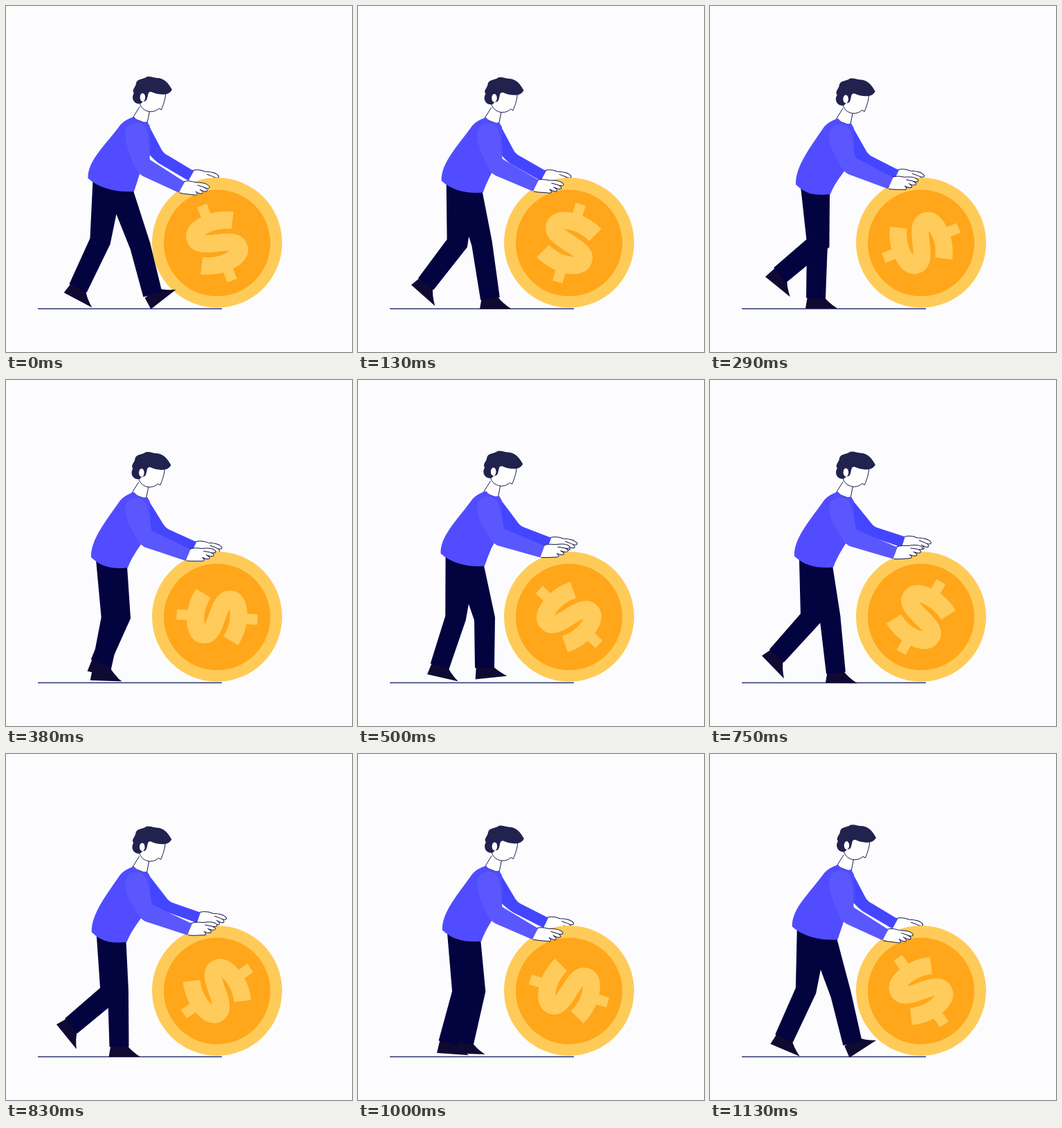
Animation, 500 px wide and 500 px high, one loop 1.18 s. Source, as an HTML page:

```html
<!DOCTYPE html>
<html lang="en">
<head>
<meta charset="utf-8">
<title>Pushing a coin</title>
<style>
  html, body { margin: 0; width: 100%; height: 100%; overflow: hidden; background: #fcfcff; }
  svg { display: block; width: 100%; height: 100%; }
  .line { fill: #fff; stroke: #17174a; stroke-width: 1; stroke-linejoin: round; stroke-linecap: round; }
  .pants { fill: #03033f; }
  .shoe { fill: #100a33; }
  .hair { fill: #22224f; }
  .near { fill: #5a57ff; }
  .torso { fill: #514cff; }
  .far { fill: #4445ff; }
</style>
</head>
<body>
<svg viewBox="0 0 500 500">
  <defs>
    <path id="hand" class="line" d="M2,-8 C8,-10 14,-9 20,-7 C28,-7 37,-6 40,-1 C41,2 36,2 32,0 C38,3 38,6 34,6
      C31,6 28,4 26,3 C32,7 31,10 27,9 C24,9 22,7 20,6 C24,10 22,12 18,11 C12,10 4,10 -3,8 M23,-3 L32,0"/>
    <path id="shoe" class="shoe" d="M-15,15 L-12,-3 L11,-3 Q17,6 31,15 Z"/>
  </defs>
  <path d="M46,437.5 H312" stroke="#28306f" stroke-width="1.6"/>

  <use id="farHand" href="#hand"/>
  <path id="farArm" class="far"/>

  <circle cx="305" cy="342" r="94" fill="#ffcb58"/>
  <circle cx="305" cy="342.5" r="77" fill="#ffa61a"/>
  <g id="sign" fill="none" stroke="#ffcb5a">
    <path stroke-width="25" d="M33,-22 C20,-29 10,-31 0,-31 C-18,-31 -27,-26 -27,-17 C-27,-8 -15,-4 0,0
      C15,4 27,8 27,17 C27,26 18,31 0,31 C-10,31 -20,29 -33,22"/>
    <path stroke-width="15" d="M0,-58.5 V-38 M0,58.5 V38"/>
  </g>

  <use id="shoeA" href="#shoe"/>
  <path id="legA" class="pants"/>
  <use id="shoeB" href="#shoe"/>
  <path id="legB" class="pants"/>

  <g id="head">
    <path class="line" d="M193,146 L183,162 L204,170 L207.500,152"/>
    <path class="line" d="M231,122 C231,134 228,141 224.500,150 L221,148 C216,153 208,154 202,151 C196,148 193,143 193,137 L196,120 Z"/>
    <path class="hair" d="M195,141 C186,143 180,134 185,126 C181,121 188,117 188,112 C189,105 199,106 203,102.500
      C210,101 213,104 218,104 C228,104 235,111 240,121 C236,129 224,130 210,124 C204,123 206,131 203,136
      C200,139 199,137 198,138 Z"/>
    <ellipse cx="197.500" cy="132" rx="3.800" ry="6" fill="#fff"/>
  </g>

  <path id="torso" class="torso"/>
  <use id="nearHand" href="#hand"/>
  <path id="nearArm" class="near"/>
</svg>
<script>
const LOOP = 1180, FRAMES = 28, FRAME_MS = 1000 / 24;

// frame, knee x, knee y, ankle x, ankle y, foot angle
const STRIDE = [
  [0, 194, 347, 212, 417, -38], [1, 189, 344, 209, 420, -15],
  [2, 184, 343, 200, 422, -3], [3, 179, 343, 191, 423, 0],
  [6, 162, 343, 163.5, 423, 0], [7, 155, 343, 153, 422, 0],
  [10, 151, 345, 130, 418, 4], [12, 141, 344, 118, 414, 13],
  [13, 138.5, 342, 107, 411, 23], [14, 136, 340, 104, 408, 28],
  [15, 138.5, 341, 102, 407, 33], [20, 151, 345, 94, 393, 51],
  [21, 157, 342, 101, 389, 39], [24, 169, 343, 153, 418, 2],
  [26, 183, 345, 183, 416, -6], [27, 189, 347, 206, 418, -33]
];

// frame, near wrist x, y, far wrist x, y
const REACH = [
  [0, 254, 262, 267.5, 245.5], [7, 261, 256, 269.5, 244.5],
  [12, 266.5, 248, 276.5, 235.5], [15, 269, 246, 279, 232.5],
  [20, 265.5, 253.5, 278.5, 236.5], [24, 256, 260, 271.5, 244],
  [27, 253.5, 261.5, 267.5, 245.5]
];

const el = id => document.getElementById(id);
const set = (id, name, value) => el(id).setAttribute(name, value);
const place = (id, x, y, turn = 0) =>
  set(id, 'transform', `translate(${x} ${y}) rotate(${turn})`);
const poly = points => 'M' + points.map(p => p.join()).join('L') + 'Z';

// Periodic cubic through unevenly spaced keys
function pose(keys, n) {
  const count = keys.length;
  const at = j => keys[(j + count) % count];
  const time = j => at(j)[0] + FRAMES * Math.floor(j / count);
  let i = count - 1;
  while (keys[i][0] > n) i--;
  const span = time(i + 1) - time(i);
  const u = (n - time(i)) / span;
  return at(i).slice(1).map((a, k) => {
    const value = j => at(j)[k + 1];
    const slope = j => (value(j + 1) - value(j - 1)) / (time(j + 1) - time(j - 1)) * span;
    const b = value(i + 1), m = slope(i), q = slope(i + 1);
    return a + u * (m + u * (3 * (b - a) - 2 * m - q + u * (2 * (a - b) + m + q)));
  });
}

function unit(x, y) {
  const d = Math.hypot(x, y);
  return [x / d, y / d];
}

// Two points across a limb, left of and right of its direction
function across(x, y, [dx, dy], half) {
  return [[x - dy * half, y + dx * half], [x + dy * half, y - dx * half]];
}

function drawLeg(name, n, hipL, hipR) {
  const [kx, ky, ax, ay, turn] = pose(STRIDE, n % FRAMES);
  const left = [hipL[0] + Math.max(0, (kx - 162) * 0.45), hipL[1]];
  const right = [hipR[0] + Math.min(0, (kx - 152) * 1.1), hipR[1]];
  const thigh = unit(kx - (left[0] + right[0]) / 2, ky - 265);
  const shin = unit(ax - kx, ay - ky);
  const bend = unit(thigh[0] + shin[0], thigh[1] + shin[1]);
  const cos = bend[0] * shin[0] + bend[1] * shin[1];
  const [kneeL, kneeR] = across(kx, ky, bend, 15 / cos);
  const [hemL, hemR] = across(ax, ay, shin, 14);
  set('leg' + name, 'd', poly([left, right, kneeR, hemR, hemL, kneeL]));
  place('shoe' + name, ax, ay, turn);
}

function drawArms(n, bob) {
  const [x, y, fx, fy] = pose(REACH, n);

  const ex = 200 + (x - 254) * 0.25, ey = 232 + (y - 262) * 0.5;
  const [low, up] = across(x, y, unit(x - ex, y - ey), 9);
  set('nearArm', 'd', `M172,${184 + bob} C173,${200 + bob} 178,${ey - 18} ${ex - 15},${ey - 2}
    Q${ex - 11},${ey + 9} ${ex - 2},${ey + 14} L${low} L${up} L${ex + 8},${ey - 10}
    C${ex + 6},${ey - 24} 208,${196 + bob} 203,${178 + bob}
    C199,${166 + bob} 175,${162 + bob} 172,${184 + bob}Z`);
  place('nearHand', x, y, (254 - x) * 0.75);

  const ux = 229 + (fx - 267.5) * 0.55, uy = 214 + (fy - 245.5) * 0.4 + bob;
  const [farLow, farUp] = across(fx, fy, unit(fx - ux + 3, fy - uy - 8), 8);
  set('farArm', 'd', `M200,${168 + bob} L206,${172 + bob} L${ux - 4},${uy - 6}
    Q${ux - 1},${uy - 1} ${ux + 5},${uy + 2} L${farUp} L${farLow}
    L${ux - 7},${uy + 14} Q${ux - 14},${uy + 10} 206,${213 + bob}Z`);
  place('farHand', fx, fy, 2);
}

function draw(n) {
  const rise = (1 - Math.cos(n / 14 * 2 * Math.PI)) / 2;
  const bob = 2.5 * rise;
  const sway = -1 + Math.cos((n - 26) / FRAMES * 2 * Math.PI);
  const hemL = [118.5 + 5.5 * rise, 247 + 9 * rise];
  const hemR = [185 - 11 * rise, 268 + 4 * rise];
  const hipL = [hemL[0] + 7, hemL[1] + 5];
  const hipR = [hemR[0] - 1, hemR[1] - 1];

  el('sign').setAttribute('transform',
    `translate(305 342.5) rotate(${-22 + n * 360 / FRAMES})`);
  drawLeg('A', n, hipL, hipR);
  drawLeg('B', n + 14, hipL, hipR);
  place('head', sway * 0.9, bob);

  const [lx, ly] = hemL, [rx, ry] = hemR;
  set('torso', 'd', `M185,${160 + bob} Q193,${170 + bob} 204,${167 + bob}
    L208,${174 + bob} L209,${214 + bob} L193,${243 - 3 * rise}
    Q${rx + 4},${ry - 12} ${rx},${ry} C${rx - 22},${ry + 2} ${lx + 16},${ly + 17} ${lx},${ly + 2}
    C${lx - 1},${ly - 24} ${145 + rise},${200 + bob} 165,${172 + bob} Q172,${164 + bob} 185,${160 + bob}Z`);
  drawArms(n, bob);
}

// Frames of 1/24 s, held on a 10 ms grid
function tick() {
  const t = Math.floor(performance.now() % LOOP / 10) * 10;
  draw(Math.min(FRAMES - 1, Math.floor((t + 4.9) / FRAME_MS)));
  requestAnimationFrame(tick);
}
tick();
</script>
</body>
</html>
```
